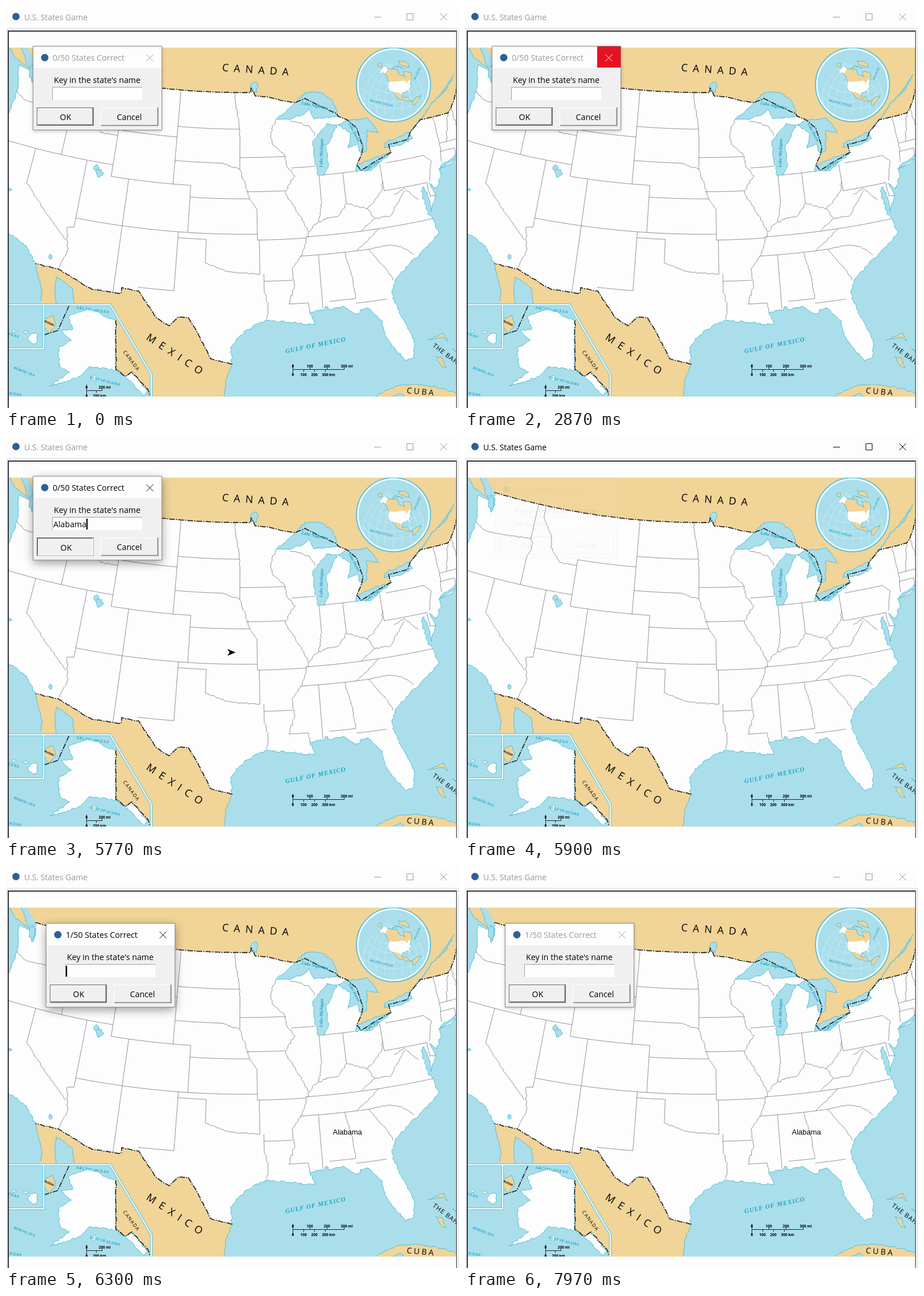
An HTML page that plays this animation: 795x705 px, repeating every 8 s.

```html
<!DOCTYPE html>
<html lang="en">
<head>
<meta charset="utf-8">
<title>U.S. States Game</title>
<style>
html, body { margin: 0; width: 100%; height: 100%; overflow: hidden; background: #fdfdfd }
#main { position: absolute; left: 0; top: 0 }
#dialog { position: absolute; outline: 1px solid #8a8a8a; background: #f0f0f0 }
text { font-family: "Open Sans", "Noto Sans", sans-serif; font-size: 14.2px; white-space: pre }
#answer { font-family: "Liberation Sans", Arial, sans-serif }
#map .sea { font-family: "Liberation Serif", Times, serif; font-style: italic; font-weight: bold; fill: #18a5c4 }
#map .tiny { font-weight: bold }
#map path { fill: none; stroke-linejoin: round }
#map .water { fill: #aadeeb }
#map .tan { fill: #f0d498 }
#map .land { fill: #fdfdfd }
#map .coast { stroke: #4fbdd6; stroke-width: 1 }
#map .state { stroke: #8d8d99; stroke-width: 1 }
#map .border { stroke: #222; stroke-width: 1.7; stroke-dasharray: 10 2 2 2 }
#map .frame { stroke: #72cadd; stroke-width: 4.5 }
#map .gap { stroke: #f4fcfd; stroke-width: 2 }
#map .river { stroke: #79cbdc; stroke-width: 2 }
#map .grid { stroke: #d5f0f5; stroke-width: .7 }
#map .bar { stroke: #222; stroke-width: 1 }
.icon { fill: #2f5f96 }
.glyph { fill: none; stroke: currentColor }
</style>
</head>
<body>
<svg id="main" width="795" height="705">
  <rect width="795" height="705" fill="#fdfdfd"/>
  <rect y="38" width="795" height="667" fill="#eeeef1"/>
  <rect x="3" y="43" width="788" height="664" fill="#34343a"/>
  <rect x="5" y="45" width="785" height="661" fill="#fdfdfd"/>
  <clipPath id="sheet"><rect x="5" y="73" width="785" height="612"/></clipPath>
  <g id="map" clip-path="url(#sheet)"></g>
  <g id="titlebar">
    <circle class="icon" cx="17.5" cy="18.5" r="6.5"/>
    <text x="32" y="24.5" fill="currentColor" style="font-size:14px">U.S. States Game</text>
    <path class="glyph" d="M646 19.5h12M703.5 13.5h11v11h-11zM762 13l12 12m0-12l-12 12"/>
  </g>
  <path id="arrow" d="M403 379.5L388.5 373.5L392.5 379.5L388.5 385.5Z"/>
  <text id="answer" x="573.5" y="471" style="font-size:13px">Alabama</text>
</svg>
<svg id="dialog" width="225" height="146">
  <rect width="225" height="38" fill="#fdfdfd"/>
  <circle class="icon" cx="20" cy="19.5" r="6.5"/>
  <text id="score" x="34" y="25" fill="currentColor"></text>
  <rect id="hover" x="184" width="41" height="37" fill="#e81123"/>
  <path id="close" class="glyph" d="M198.5 14l12 12m0-12l-12 12"/>
  <text x="36" y="64">Key in the state's name</text>
  <rect x="33" y="71" width="158" height="23" fill="#fdfdfd"/>
  <path d="M33.5 94V71.5H191" fill="none" stroke="#a0a0a0"/>
  <text id="entry" x="35" y="88.5">Alabama</text>
  <rect id="caret" y="74" width="2.2" height="19"/>
  <rect x="6.5" y="107.5" width="99" height="31" fill="#f0f0f0" stroke="#5f5f5f"/>
  <path id="light" d="M7.5 137V108.5H104" fill="none"/>
  <path id="dark" d="M8 137.500H104.500V108" fill="none" stroke-width="2"/>
  <text id="ok" text-anchor="middle">OK</text>
  <path d="M118.5 138V107.5H219" fill="none" stroke="#fff"/>
  <path d="M119 138.5H218.5V107" fill="none" stroke="#777" stroke-width="1.7"/>
  <text x="168.5" y="128.5" text-anchor="middle">Cancel</text>
</svg>
<script>
const $ = id => document.getElementById(id);
const { sin, cos, hypot, ceil, PI } = Math;

let seed = 7;
const random = () => (seed = seed * 16807 % 2147483647) / 2147483647;
const jitter = amp => (random() - .5) * 2 * amp;

// Projections take degrees west and north.
const conic = (x, y, scale, top, bend, mid) => (lon, lat) => {
  const r = scale * (top - lat), a = bend * (mid - lon);
  return [x + r * sin(a), y + r * cos(a)];
};
const mainland = conic(418, -1143.5, 20.7, 111.58, .0107, 96);
const alaska = conic(193, 347, 9.25, 91.7, .0158, 141);
const globe = (lon, lat) => {
  const rad = PI / 180, d = (113 - lon) * rad, p = lat * rad, c = 44 * rad;
  return [680 + 61 * cos(p) * sin(d), 138 - 61 * (cos(c) * sin(p) - sin(c) * cos(p) * cos(d))];
};

// Projects a "lon lat,lon lat" route in short steps with small wiggles.
function route(text, amp = 0, project = mainland) {
  const pts = text.split(',').map(p => p.trim().split(' ').map(Number));
  const out = [];
  pts.forEach(([lon, lat], i) => {
    const [lon0, lat0] = pts[i - 1] || [lon, lat];
    const [x, y] = project(lon, lat), [x0, y0] = project(lon0, lat0);
    const n = ceil(hypot(x - x0, y - y0) / 4) || 1;
    for (let k = 1; k <= n; k++) {
      const [u, v] = project(lon0 + (lon - lon0) * k / n, lat0 + (lat - lat0) * k / n);
      const a = k < n ? amp : 0;
      out.push((u + jitter(a)).toFixed(1) + ',' + (v + jitter(a)).toFixed(1));
    }
  });
  return out.join(' ');
}
function node(name, attrs, text = '') {
  const el = document.createElementNS('http://www.w3.org/2000/svg', name);
  for (const k in attrs) el.setAttribute(k, attrs[k]);
  el.textContent = text;
  $('map').append(el);
}
const path = (cls, d) => node('path', { class: cls, d });
const lines = (cls, amp, text, project) =>
  path(cls, text.split('|').map(s => 'M' + route(s, amp, project)).join(''));
const areas = (cls, amp, text, project) =>
  path(cls, text.split('|').map(s => 'M' + route(s + ',' + s.split(',')[0], amp, project) + 'Z').join(''));
function blob(cls, x, y, rx, ry = rx) {
  const pts = Array.from({ length: 12 }, (_, i) => {
    const a = i * PI / 6, r = 1 + jitter(.25);
    return (x + rx * r * cos(a)).toFixed(1) + ',' + (y + ry * r * sin(a)).toFixed(1);
  });
  path(cls, 'M' + pts.join(' ') + 'Z');
}
const label = (text, x, y, turn, size, cls = '', gap = 0) =>
  node('text', { class: cls, transform: `translate(${x} ${y}) rotate(${turn})`, style: `font-size:${size}px;letter-spacing:${gap}px` }, text);

// Outline of the mainland, clockwise from the north-west
const outline = [
  ['122.8 49,95.2 49,95.1 49.4,94.6 48.7,93 48.6,91 48.2,89.6 48,88.4 48.3,84.8 46.8,84.5 46.5,83.5 46.1,82.5 45.3,82.1 43.6,82.5 42.9,83.1 42.2,82.7 41.7,81.2 42.2,79 42.8,79.1 43.5,76.8 43.6,76.3 44.2,74.9 45,71.5 45,71 45.3,70.3 46,69.2 47.4', .3],
  ['71 42.3,71.5 41.4,73.8 40.8,74.1 40.6,74 40.1,74.8 39,75.5 39.6,75.1 38.6,75.9 37.2,75.8 38,76.1 39.4,76.5 39.1,76.3 37,76 36.8,75.6 35.3,76.5 34.7,78 33.9,79.2 33.2,80.8 32.2,81.4 31.2,81.3 30.2,80.6 28.4,80 26.8,80.3 25.4,81.1 25.2,81.8 26.1,82.7 27.6,82.7 28.8,84 30.1', 1.7],
  ['84 30.1,85.2 29.7,86.2 30.4,87.6 30.3,88 30.6,88.2 30.3,89.6 30.2,89.4 29.8,89.2 29.1,90.2 29.2,91.3 29.4,93.8 29.7,95 29.3,96.4 28.4,97.3 27.4,97.1 26', 2],
  ['97.1 26,99.1 26.4,100.3 28.3,101.4 29.8,102.4 29.8,103.2 29,104.5 29.6,106.5 31.7,108.2 31.8,108.2 31.3,111.1 31.3,114.8 32.5,117.1 32.5', .7],
  ['117.1 32.5,118.4 33.8,120.6 34.5,121.9 36.6,124.4 40.4,124.1 44,123.9 46.2,124.7 48.4,122.9 48.2,122.5 47.3,122.3 48,122.8 49', 1.3],
];
const [north, atlantic, gulf, south, west] = outline.map(([s, amp]) => route(s, amp));

path('water', 'M4 73H790V685H4Z');
path('tan', `M${north} L800,60 30,60Z`);
areas('tan coast', 1.5, '123.4 48.4,125.5 48.9,128 50.6,125.2 50');
path('tan', `M${south} ${route('117.1 32.5,115.9 30.4,115.8 29.5,113 26,100 20,97.8 22,97.7 24.5,97.1 26')}Z`);
lines('coast', 1, '117.1 32.5,115.9 30.4,115.8 29.5|97.1 26,97.7 24.5,97.8 22');
areas('water coast', 1, '114.8 31.8,114.6 30.3,114 29,112.3 29,113 31.1,114 31.5');
path('land', 'M' + [north, atlantic, gulf, south, west].join(' ') + 'Z');
for (const shore of [atlantic, gulf, west]) path('coast', 'M' + shore);

// Great Lakes, small lakes and the St. Lawrence
areas('water coast', 1.4, '92.1 46.7,89.6 48,88.3 48.8,86.4 48.7,85 47.9,84.5 46.5,87.5 46.5,88 47.4,88.6 47,90.5 46.6|87.6 41.7,87.8 43,87.9 44.6,86 46,84.8 45.8,85.5 45,86.4 44,86.3 42.5,86.9 41.7|84.7 45.8,83.5 46.1,81 46,80 44.6,81.3 45,81.7 43.4,82.4 43,82.7 44,83.8 43.7,83.3 45|83.4 41.7,81.5 41.6,78.9 42.8,81 42.6,83.1 42.2|79.7 43.3,77.5 43.3,76.2 43.6,76.5 44.2,79.4 43.7');
lines('river', .8, '76.3 44.2,74.5 45.2,73 46.2,71 46.9,69.5 48|72 46.5,70 47.7');
blob('water coast', 159, 284, 5);
blob('water coast', 164, 293, 6, 7);
blob('water coast', 78, 440, 3, 4);
blob('water coast', 435, 142, 7, 9);
blob('water coast', 46, 117, 5, 12);
blob('water coast', 6, 322, 4, 2);
areas('land coast', .5, '74 40.6,72 41.1,72.5 40.8');

// Ruled state borders: "parallel from to" and "meridian from to"
const ruled = (text, order) => lines('state', 0, text.split(',').map(s => {
  const [at, a, b] = s.split(' ');
  return order(at, a) + ',' + order(at, b);
}).join('|'));
ruled('45 111 104,45.9 104 96.6,43 104 98.5,42 124.3 111,41 111 102,40 102 95.4,37 114 94.6,36.5 103 100,36.5 94.6 89.5,36.6 89.5 75.9,35 90.2 83.1,32 106.6 103,33 94 91.1,31 91.6 89.7,31 87.6 85,30.6 85 82,43.5 96.5 91.2,40.6 95.8 91.4,42.5 90.6 87.8,42 79.8 75.4,39.7 80.5 75.7,42 73.5 71.8,42.7 73.3 71,41.7 87 83.5', (lat, lon) => lon + ' ' + lat);
ruled('117 49 46,117 44.2 42,120 42 39,116 49 48,114 42 36.2,111 45 41,109 41 31.3,104 49 41,103 37 32,102 41 37,100 36.5 34.5,94.6 39.1 36.5,94.4 36.5 33.6,94 33.6 32,87.5 41.7 39.3,84.8 41.7 39.1,80.5 42 39.7,88.3 35 30.4,96.5 45.3 42.5', (lon, lat) => lon + ' ' + lat);

// Borders along rivers and ridges
lines('state', 1.2, '123.9 46.2,122.8 45.7,121.2 45.7,119 45.9,117 46,116.6 45.6,117 44.2|116 48,114.7 46.7,114.4 45.6,113 44.5,111 44.5|120 39,114.6 35|114 36.2,114.7 36.1,114.2 34.2,114.7 32.6|100 34.5,97.5 33.8,94.4 33.6|98.5 43,96.5 42.5|97.2 49,96.6 46,96.5 45.3|96.5 42.5,95.9 41.3,95.4 40,94.6 39.1');
lines('state', 1.7, '92.1 46.7,92.8 45.6,92.7 44.7,91.2 43.5,91.1 42.7,90.2 41.8,91.1 41,91.4 40.4,90.2 38.7,89.1 37,90.1 35,91.1 34,91 32.3,91.6 31|89.7 31,89.6 30.2|94 32,93.6 31.1,93.8 29.8|90.4 46.5,88.1 45.9,87.6 45.1|87.5 39.3,88 37.8|89.1 37,88 37.8,85.7 38.2,84.8 39.1,82.6 38.4,80.8 39.7,80.5 40.6');
lines('state', 1.2, '82.6 38.4,82 37.5,83.6 36.6|82 37.5,80.3 37.5,78.3 39.4|79.5 39.2,78.3 39.6,77 38.4|81.7 36.6,84.3 35|83.1 35,81.5 33,81.1 32.1|83.1 35,81 35.1,79.7 34.8,78.6 33.9|85.6 35,85.1 32.9,85 31|75.4 42,74.7 41.4,75.1 40.6,75.4 39.8|73.3 45,73.3 42.7,73.6 41.1|71.5 45,72.5 42.7|71 45.3,70.8 43.1|75.7 39.7,75.7 38.5,75 38.5|71.8 42,71.9 41.3');
for (const edge of [north, south]) path('border', 'M' + edge);

// Cuba and the Bahamas
areas('tan coast', 1.5, '84.9 21.8,84 22.7,82.4 23.2,80.5 23.1,78.5 22.4,77 21.7,77 20,80 21.7,81.5 22,82 22.5,83.3 22.3');
areas('tan coast', 1, '78.3 25.1,77.8 24.9,77.6 24,78 24.2|78.8 26.6,77.2 26.9,77 26.2,77.4 26.6|76.7 25.5,76.2 24.8,76.3 25.1');

// Alaska and Hawaii insets
const coastAK = '141 69.6,149 70.5,156.5 71.3,162 70,166.5 68.5,162 66.6,167 65.5,161 64.5,165 62.3,162 59,158 58.7,163 55,154 58.3,151 60.5,148 60.5,141 60.2';
const edgeAK = '141 69.6,141 60.3,137.5 59,135 59.7,133 58.2,130.2 56,130 54.8';
path('water', 'M4 524H183L255 646V685H4Z');
path('tan', `M193 541L255 646V686L${route(edgeAK.split(',').reverse().join(','), 0, alaska)}Z`);
areas('land coast', 1.8, coastAK + '|141 60.3,137.5 59,135 59.6,133 58.2,130.5 55.5,132 55,135 57.5,138 59', alaska);
lines('border', .8, edgeAK, alaska);
path('border', 'M111 525L91 569L66 577');
blob('land coast', 47, 582, 8, 10);
blob('land coast', 35, 572, 5, 2);
blob('land coast', 14, 570, 4, 2);
blob('land coast', 155, 653, 4, 5);
blob('tan coast', 76, 557, 10, 14);
for (const cls of ['frame', 'gap']) path(cls, 'M0 524H183L255 646V690M0 601H66V524');

// Globe
node('circle', { cx: 680, cy: 138, r: 65, fill: '#aadeeb', stroke: '#5fc3d9', 'stroke-width': 2 });
node('circle', { cx: 680, cy: 138, r: 62.5, fill: 'none', stroke: '#f4fcfd', 'stroke-width': 2.5 });
for (let lon = 53; lon <= 173; lon += 15) lines('grid', 0, `${lon} 80,${lon} -20`, globe);
for (let lat = 0; lat <= 75; lat += 15) lines('grid', 0, `173 ${lat},53 ${lat}`, globe);
areas('tan coast', 1, '168 66,156 71,130 70,95 70,94 60,82 55,79 52,78 62,65 60,56 52,66 45,75 38,81 31,80 25,84 30,97 28,97 20,90 21,87 16,83 9,79 9,72 12,60 8,75 -3,80 0,79 7,95 16,106 21,113 30,124 40,124 48,135 58,152 60,160 55,165 62|70 77,55 70,45 60,25 70,40 82|172 66,185 70,195 66,188 62|120 72,100 74,75 72,68 66,80 74,100 78', globe);
path('land', 'M' + outline.map(([s]) => route(s, 0, globe)).join(' ') + 'Z');
areas('land', .5, coastAK, globe);

// Names
label('CANADA', 379, 114, 4, 18, '', 9);
label('MEXICO', 245, 584, 33.5, 18, '', 9.5);
label('CUBA', 703, 679, 5, 14, '', 3.5);
label('THE BAHAMAS', 748, 597, 37, 11, '', 1.2);
label('CANADA', 205, 607, 53, 8.5, '', 1.4);
label('RUSSIA', 67, 554, 25, 5, 'tiny');
label('GULF OF MEXICO', 491, 609, -11.5, 11, 'sea', 1);
label('ARCTIC OCEAN', 123, 531, 8, 7, 'sea', .6);
label('BERING SEA', 13, 636, 21, 6.5, 'sea', .1);
label('GULF OF ALASKA', 147, 653, 14, 6.5, 'sea');
label('OCEAN', -1, 575, 18, 7, 'sea');
label('OCEAN', 3, 681, 8, 7, 'sea');
label('PACIFIC OCEAN', 638, 167, 14, 5.5, 'sea');
label('ATLANTIC', 718, 130, -65, 5, 'sea');
label('Lake Superior', 518, 172, 12, 8, 'sea');
label('Lake Michigan', 555, 283, -88, 8, 'sea');
label('Lake Huron', 601, 207, 62, 7, 'sea');
label('Lake Erie', 632, 289, -32, 7, 'sea');

// Scale bars
function scaleBar(x, y, step, count, unit, up) {
  for (let i = 0; i <= count; i++) {
    const text = i * unit + (i === count ? (up ? ' mi' : ' km') : '');
    path('bar', `M${x + i * step} ${y}v${up ? -4 : 4}`);
    label(text, x + i * step - (i ? 6 : 2), up ? y - 4 : y + 11, 0, 6.5, 'tiny');
  }
}
path('bar', 'M503.5 628V647M503 637.5H594M141.5 664V685M141 674.5H169');
scaleBar(503.5, 637.5, 30, 3, 100, true);
scaleBar(503.5, 637.5, 19, 3, 100, false);
scaleBar(141.5, 674.5, 27, 1, 200, true);
scaleBar(141.5, 674.5, 17, 1, 200, false);

const clamp = v => Math.max(0, Math.min(1, v));
const show = (id, on) => $(id).style.opacity = +on;

function draw(t) {
  const first = t < 6000;
  const focus = first ? 4370 : 6100;
  const active = first ? t >= 4370 && t < 5800 : t < 7930;
  const alpha = first ? 1 - clamp((t - 5800) / 107) : clamp((t - 6070) / 160);
  const typed = first && t >= 4700;
  const pressed = first && t >= 5670;
  const glow = active ? clamp((t - focus + 50) / 100) : 0;
  const hover = t >= 2870 ? 1 - clamp((t - 2900) / 100) : 0;

  $('titlebar').style.color = t >= 5800 && t < 6070 ? '#000' : '#999';
  show('arrow', t >= 5730 && t < 5830);
  show('answer', t >= 5930);

  const box = $('dialog').style;
  box.left = (first ? 48 : 71) + 'px';
  box.top = (first ? 71 : 101) + 'px';
  box.opacity = alpha;
  box.transform = `scale(${.94 + .06 * alpha})`;
  box.color = active ? '#000' : '#999';
  box.boxShadow = `0 ${2 + 3 * glow}px ${7 + 9 * glow}px rgba(0,0,0,${.28 + .14 * glow})`;
  $('score').textContent = (first ? 0 : 1) + '/50 States Correct';
  show('hover', hover);
  $('close').style.stroke = hover > .4 ? '#fff' : 'currentColor';
  show('entry', typed);
  show('caret', t >= focus && (first || active) && (t - focus) % 900 < 600);
  $('caret').setAttribute('x', typed ? 93 : 34);
  $('light').setAttribute('stroke', pressed ? '#777' : '#fff');
  $('dark').setAttribute('stroke', pressed ? '#fff' : '#777');
  $('ok').setAttribute('x', pressed ? 57.5 : 56.5);
  $('ok').setAttribute('y', pressed ? 129.5 : 128.5);
}

function tick() {
  draw(performance.now() % 8000);
  requestAnimationFrame(tick);
}
tick();
</script>
</body>
</html>
```
